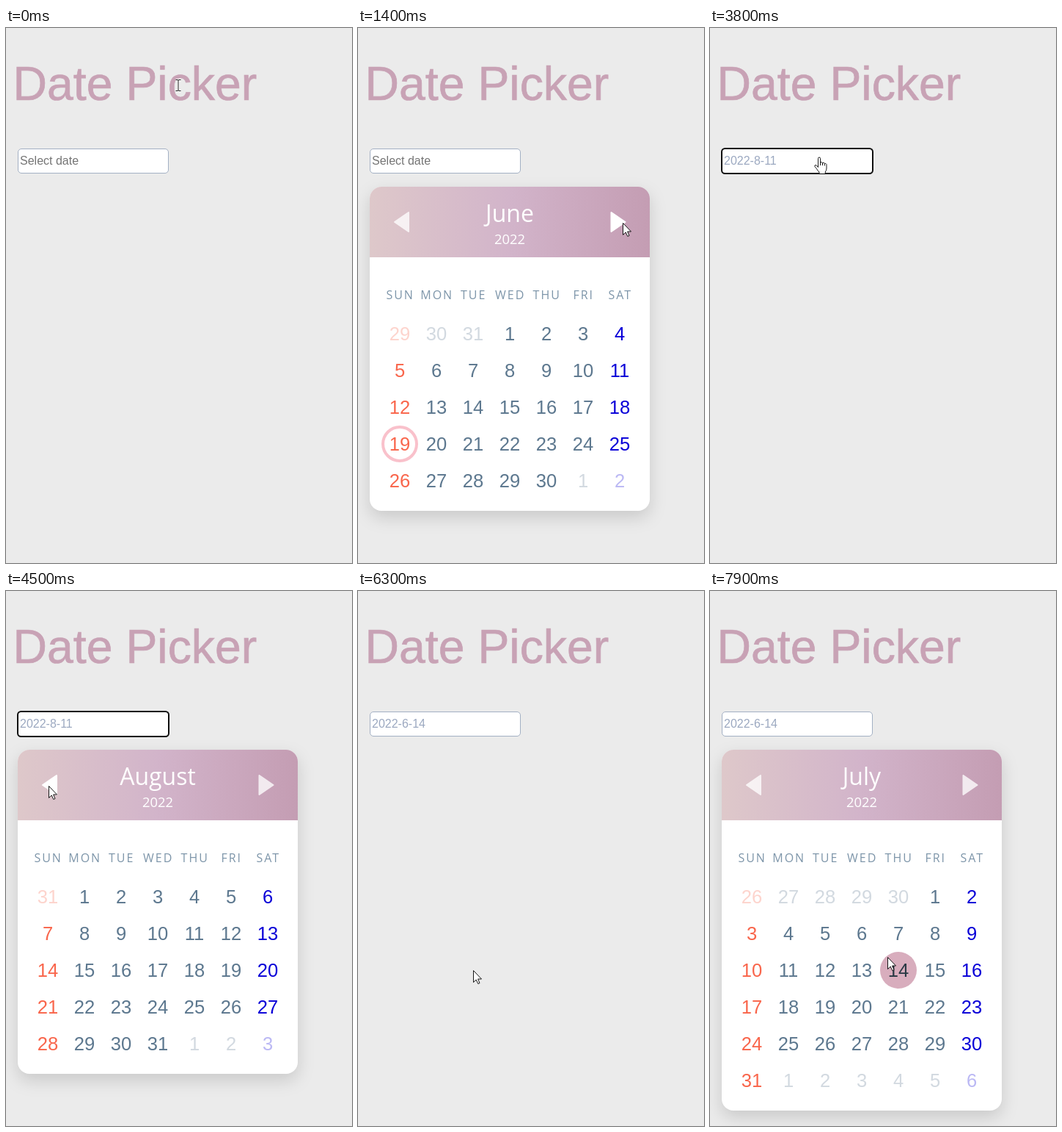
Recreate the animation shown at these times as an HTML page. Size 472 by 728 pixels, loop 8 s.

```html
<!DOCTYPE html>
<html lang="en">
<head>
<meta charset="utf-8">
<title>Date Picker</title>
<style>
  html, body { margin: 0; width: 100%; height: 100%; overflow: hidden; background: #ebebeb; }
  svg { display: block; width: 472px; height: 728px; }
  text { font-family: "Liberation Sans", Arial, sans-serif; }
  .title { font-size: 64.4px; fill: #c8a2b5; stroke: #c8a2b5; stroke-width: .7; }
  .field { x: 16.5px; y: 164.5px; width: 205px; height: 33px; rx: 4.5px; fill: #fff; stroke: #a3b0c4; }
  .field.focus { x: 16px; y: 164px; width: 206px; height: 34px; stroke: #101010; stroke-width: 2; }
  #value { font-size: 16px; fill: #9ba8c0; }
  #value.empty { fill: #757575; }
  .card { fill: #fff; filter: drop-shadow(0 9px 11px rgba(0, 0, 0, .14)); }
  .head { font-family: "Open Sans", "Noto Sans", sans-serif; fill: #fff; text-anchor: middle; }
  .month { font-size: 32px; }
  .year { font-size: 18.4px; }
  .week text { font: 16px "Open Sans", "Noto Sans", sans-serif; letter-spacing: 2px; fill: #7d95a9; text-anchor: middle; }
  .nav { fill: #fff; stroke: #fff; stroke-width: 2; stroke-linejoin: round; opacity: .78; }
  .nav.hover { opacity: 1; }
  .day text { font-size: 25.6px; fill: #5d788f; text-anchor: middle; }
  .day.sun text { fill: #f9664c; }
  .day.sat text { fill: #0a00d8; }
  .day.out text { fill-opacity: .28; }
  .day circle { fill: none; }
  .day.today circle { stroke: #f9c1cb; stroke-width: 4; }
  .day.hover circle { fill: #d8adbd; }
  .day.hover text { fill: #2a3a45; }
  .pointer path { fill: #fff; stroke: #000; stroke-width: .9; stroke-linejoin: round; }
  .pointer .line { fill: none; }
  .pointer .halo { fill: none; stroke: #fff; stroke-width: 2.6; }
</style>
</head>
<body>
<svg viewBox="0 0 472 728">
  <defs>
    <linearGradient id="pink">
      <stop offset="0" stop-color="#dec8ca"/>
      <stop offset=".5" stop-color="#d2b4ca"/>
      <stop offset="1" stop-color="#c49db3"/>
    </linearGradient>
  </defs>
  <text class="title" x="9.5" y="98">Date Picker</text>
  <rect id="field" class="field"/>
  <text id="value" x="19" y="186"></text>

  <g id="calendar">
    <rect id="card" class="card" x="16" y="216" width="382" height="441" rx="16"/>
    <path fill="url(#pink)" d="M16 312V232a16 16 0 0 1 16-16h350a16 16 0 0 1 16 16v80z"/>
    <path id="prev" class="nav" d="M50 264L69 251V277z"/>
    <path id="next" class="nav" d="M364.5 264L345.5 251V277z"/>
    <text id="month" class="head month" x="207" y="264"></text>
    <text class="head year" x="207" y="294">2022</text>
    <g id="week" class="week"></g>
    <g id="days"></g>
  </g>

  <g id="pointer" class="pointer">
    <g id="arrow"><path d="M.5 .5V16.5L4.2 13L6.8 18.5L9 17.500L6.600 12H11.5z"/></g>
    <g id="hand">
      <path d="M-1.500 13.500V1.500a1.500 1.500 0 0 1 3 0V7q1.800-1.200 3 .5q1.800-1 2.800.8q1.700-.6 2.700 1.200V15q0 2.800-1.800 5v2.500H0V20q-2.500-2-3.500-4.500L-6 12.500q-.6-1.800 1-2q1.500 0 3.500 3z"/>
      <path class="line" d="M1.500 7V11M4.500 7.500V11M7.300 8.500V11.500"/>
    </g>
    <g id="ibeam">
      <path class="halo" d="M-3.500-7.500H3.500M-3.500 7.500H3.500M0-7.500V7.500"/>
      <path class="line" d="M-3.500-7.500H-1L0-6.800L1-7.500H3.500M-3.500 7.500H-1L0 6.800L1 7.500H3.500M0-6.800V6.800"/>
    </g>
  </g>
</svg>

<script>
const LOOP = 8000, STEP = 100, CELL = 50;
const JUNE = 5, JULY = 6, AUGUST = 7;
const MONTHS = { [JUNE]: 'June', [JULY]: 'July', [AUGUST]: 'August' };

// Each entry: start time, state
const views = [
  [0, null], [700, JUNE], [1500, JULY], [2000, AUGUST], [3100, null],
  [3900, AUGUST], [4700, JULY], [5200, JUNE], [6300, null], [6800, JUNE], [7400, JULY]
];
const focus = [
  [0, false], [600, true], [1400, false], [3700, true], [4600, false], [6700, true], [7300, false]
];
const values = [[0, ''], [3100, '2022-8-11'], [6300, '2022-6-14']];

// Pointer stops: time, x, y
const stops = [
  [0, 235, 78], [300, 145, 159], [400, 145, 159], [600, 149, 176], [700, 149, 176],
  [1300, 361, 265], [2100, 361, 265], [2700, 266, 471], [2800, 266, 471], [2900, 254, 465],
  [3100, 254, 465], [3600, 149, 176], [3900, 149, 176], [4500, 58, 265], [5200, 58, 265],
  [5400, 150, 448], [6000, 157, 516], [6300, 157, 516], [6600, 150, 178], [6800, 150, 178],
  [7200, 361, 265], [7400, 361, 265], [7900, 242, 498]
];

const $ = id => document.getElementById(id);
const stateAt = (list, t) => list.filter(([start]) => start <= t).pop()[1];
const inside = ([x, y], left, top, w, h) => x >= left && x < left + w && y >= top && y < top + h;
const show = (el, on) => { el.style.display = on ? '' : 'none'; };

function add(parent, name, attrs = {}) {
  const el = document.createElementNS('http://www.w3.org/2000/svg', name);
  for (const key in attrs) el.setAttribute(key, attrs[key]);
  return parent.appendChild(el);
}

['SUN', 'MON', 'TUE', 'WED', 'THU', 'FRI', 'SAT'].forEach((name, i) => {
  add($('week'), 'text', { x: 57.7 + i * CELL, y: 369 }).textContent = name;
});

const cells = Array.from({ length: 42 }, (_, i) => {
  const x = 57 + (i % 7) * CELL, y = 416 + Math.floor(i / 7) * CELL;
  const group = add($('days'), 'g');
  const circle = add(group, 'circle', { cx: x, cy: y });
  const label = add(group, 'text', { x, y: y + 9 });
  return { x, y, group, circle, label };
});

function pointerAt(t) {
  const i = stops.findIndex(([time]) => time > t);
  if (i < 0) return stops[stops.length - 1].slice(1);
  const [t0, x0, y0] = stops[i - 1], [t1, x1, y1] = stops[i];
  const p = (t - t0) / (t1 - t0), k = p * p * (3 - 2 * p);
  return [x0 + (x1 - x0) * k, y0 + (y1 - y0) * k].map(Math.round);
}

function drawMonth(month, tip) {
  const first = new Date(Date.UTC(2022, month, 1)).getUTCDay();
  const length = new Date(Date.UTC(2022, month + 1, 0)).getUTCDate();
  const rows = Math.ceil((first + length) / 7);
  $('card').setAttribute('height', 191 + rows * CELL);
  $('month').textContent = MONTHS[month];
  $('prev').classList.toggle('hover', inside(tip, 48, 249, 24, 30));
  $('next').classList.toggle('hover', inside(tip, 342, 249, 24, 30));
  cells.forEach(({ x, y, group, circle, label }, i) => {
    show(group, i < rows * 7);
    const day = i - first + 1, out = day < 1 || day > length;
    const today = month === JUNE && day === 19;
    const classes = ['day', i % 7 === 0 && 'sun', i % 7 === 6 && 'sat', out && 'out', today && 'today',
      inside(tip, x - 25, y - 25, CELL, CELL) && 'hover'];
    group.setAttribute('class', classes.filter(Boolean).join(' '));
    circle.setAttribute('r', today ? 23 : 25);
    label.textContent = new Date(Date.UTC(2022, month, day)).getUTCDate();
  });
}

function draw(t) {
  const tip = pointerAt(t), month = stateAt(views, t), value = stateAt(values, t);
  $('field').classList.toggle('focus', stateAt(focus, t));
  $('value').textContent = value || 'Select date';
  $('value').classList.toggle('empty', !value);
  show($('calendar'), month !== null);
  if (month !== null) drawMonth(month, tip);

  const kind = inside(tip, 8, 40, 334, 72) ? 'ibeam' : inside(tip, 16, 164, 206, 34) ? 'hand' : 'arrow';
  ['arrow', 'hand', 'ibeam'].forEach(id => show($(id), id === kind));
  $('pointer').setAttribute('transform', `translate(${tip})`);
}

let shown = -1;
function tick() {
  const t = Math.floor(performance.now() % LOOP / STEP) * STEP;
  if (t !== shown) draw(shown = t);
  requestAnimationFrame(tick);
}
tick();
</script>
</body>
</html>
```
